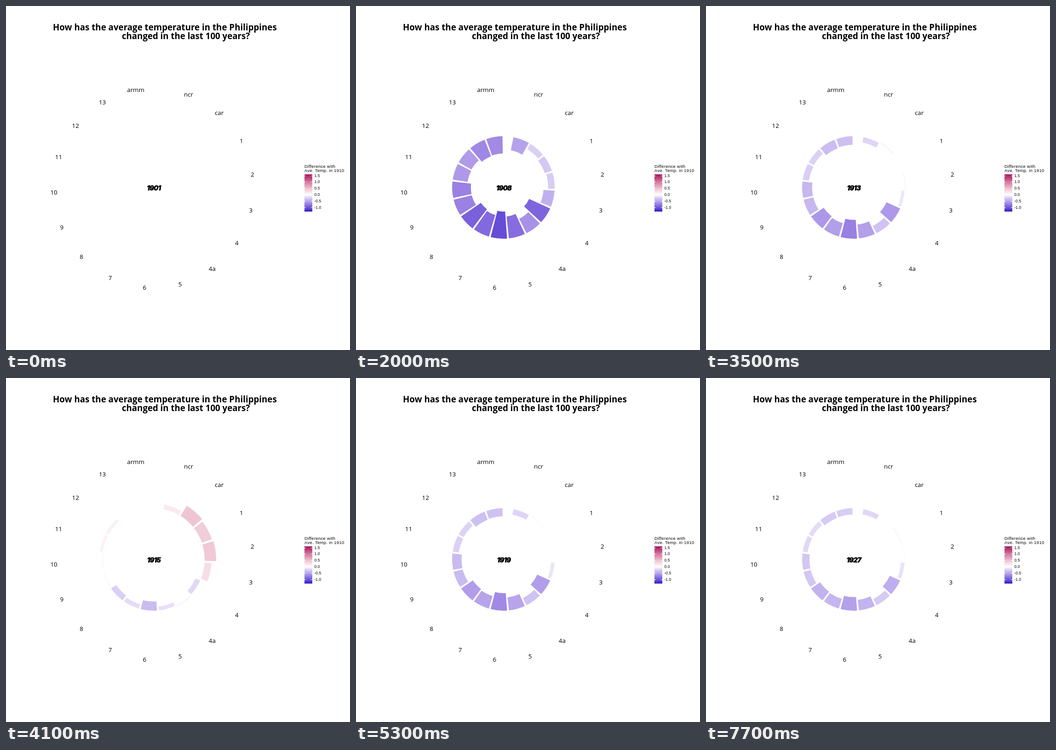
An HTML page with a canvas that plays this animation: 748 px wide and 748 px high, repeating every 8000 ms.

```html
<!DOCTYPE html>
<html lang="en">
<head>
<meta charset="utf-8">
<title>Average temperature</title>
<style>
html, body { margin: 0; width: 100%; height: 100%; overflow: hidden; background: #fff; }
canvas { display: block; width: 748px; height: 748px; }
</style>
</head>
<body>
<canvas id="stage" width="748" height="748"></canvas>
<script>
const ctx = document.getElementById('stage').getContext('2d');
const SIZE = 748, LOOP = 8000, STEP = 300, FIRST_HOLD = 200, START = 1901;
const CX = 320.5, CY = 394.5, BASE = 111.5, LABEL_R = 217;
const SLOT = 2 * Math.PI / 17.5, HALF = 0.45 * SLOT;
const UNIT = 55.75; // pixels per degree of difference
const SANS = '"Open Sans", sans-serif', SMALL = '"Liberation Sans", Arial, sans-serif';

// Typical cooling of each region, in pixels, listed clockwise from the north.
const regions = Object.entries({
  ' ncr': 25, ' car': 9, ' 1': 12, ' 2': 10, ' 3': 20, ' 4': 46, ' 4a': 31, ' 5': 44, ' 6': 56,
  ' 7': 47, ' 8': 51, ' 9': 40, ' 10': 40, ' 11': 32, ' 12': 31, ' 13': 38, ' armm': 37
}).map(([key, cold]) => ({ name: key.trim(), cold }));

// Year: share of the typical cooling, warming in the north, warming in the south.
const climate = [
  [1901, [0, 0, 0]], [1905, [1, 0, 0]], [1911, [1, -8.5, -1.5]], [1915, [1, 35, 38]],
  [1919, [0.9, 10.5, 15.5]], [1923, [1, -8, 1]], [1927, [0.65, 5, 10]]
];

const stops = [
  [-74, [43, 28, 200]], [-61, [97, 70, 213]], [-37, [164, 140, 230]], [-14, [216, 205, 244]],
  [0, [255, 255, 255]], [25, [240, 200, 214]], [56, [214, 120, 158]], [89, [166, 21, 96]]
];

const lerp = (a, b, k) => a + (b - a) * k;
const clamp = x => Math.min(1, Math.max(0, x));

function smooth(from, to, x) {
  const k = clamp((x - from) / (to - from));
  return k * k * (3 - 2 * k);
}

function between(points, x) {
  let i = 1;
  while (i < points.length - 1 && x > points[i][0]) i++;
  const [x0, a] = points[i - 1], [x1, b] = points[i];
  const k = clamp((x - x0) / (x1 - x0));
  return a.map((v, j) => lerp(v, b[j], k));
}

const colour = len => `rgb(${between(stops, len).map(Math.round).join(',')})`;

function text(str, x, y, font, spacing = 0) {
  ctx.font = font;
  ctx.letterSpacing = spacing + 'px';
  ctx.fillStyle = '#000';
  ctx.fillText(str, x, y);
}

function drawTitle() {
  const font = 'bold 18.67px ' + SANS;
  text('How has the average temperature in the Philippines', 102, 53, font, 0.04);
  text('changed in the last 100 years?', 252, 72, font);
}

function drawLabels() {
  ctx.textAlign = 'center';
  regions.forEach(({ name }, i) => {
    const a = (i + 1) * SLOT;
    const x = CX + LABEL_R * Math.sin(a), y = CY - LABEL_R * Math.cos(a);
    text(name, x + 0.3, Math.round(y + 5.9), '13.33px ' + SANS);
  });
  ctx.textAlign = 'left';
}

function drawLegend() {
  const x = 649, w = 17, top = 366, bottom = 447, zero = 410.5, scale = 27.6;
  text('Difference with', x, 352, '9.33px ' + SMALL, 0.38);
  text('Ave. Temp. in 1910', x, 361, '9.33px ' + SMALL, 0.38);

  const grad = ctx.createLinearGradient(0, top, 0, bottom);
  for (const [len] of stops) {
    const y = zero - len / UNIT * scale;
    grad.addColorStop(clamp((y - top) / (bottom - top)), colour(len));
  }
  ctx.fillStyle = grad;
  ctx.fillRect(x, top, w, bottom - top);

  for (let v = 1.5; v >= -1; v -= 0.5) {
    const y = Math.round(zero - v * scale - 0.5);
    ctx.fillStyle = '#fff';
    ctx.fillRect(x, y, 3, 1);
    ctx.fillRect(x + w - 3, y, 3, 1);
    text(v.toFixed(1), 670.5, y + 3, '8.6px ' + SMALL);
  }
}

function drawBars(year) {
  const [share, north, south] = between(climate, year);
  regions.forEach(({ cold }, i) => {
    const len = lerp(north, south, smooth(6, 11, i)) - share * cold;
    if (Math.abs(len) < 0.3) return;
    const mid = (i + 1) * SLOT - Math.PI / 2;
    ctx.beginPath();
    ctx.arc(CX, CY, BASE, mid - HALF, mid + HALF);
    ctx.arc(CX, CY, BASE + len, mid + HALF, mid - HALF, true);
    ctx.closePath();
    ctx.fillStyle = colour(len);
    ctx.fill();
  });
}

function drawYear(year) {
  ctx.textAlign = 'center';
  text(year, 321.5, 401, 'italic 800 14.5px Inter, sans-serif', -0.6);
  ctx.lineWidth = 0.7;
  ctx.strokeStyle = '#000';
  ctx.strokeText(year, 321.5, 401);
  ctx.textAlign = 'left';
}

function draw(now) {
  const t = now % LOOP;
  const year = START + (t < FIRST_HOLD ? 0 : 1 + Math.floor((t - FIRST_HOLD) / STEP));
  ctx.fillStyle = '#fff';
  ctx.fillRect(0, 0, SIZE, SIZE);
  drawTitle();
  drawLabels();
  drawLegend();
  drawBars(year);
  drawYear(year);
}

const begin = performance.now();
function tick() {
  draw(performance.now() - begin);
  requestAnimationFrame(tick);
}
tick();
</script>
</body>
</html>
```
